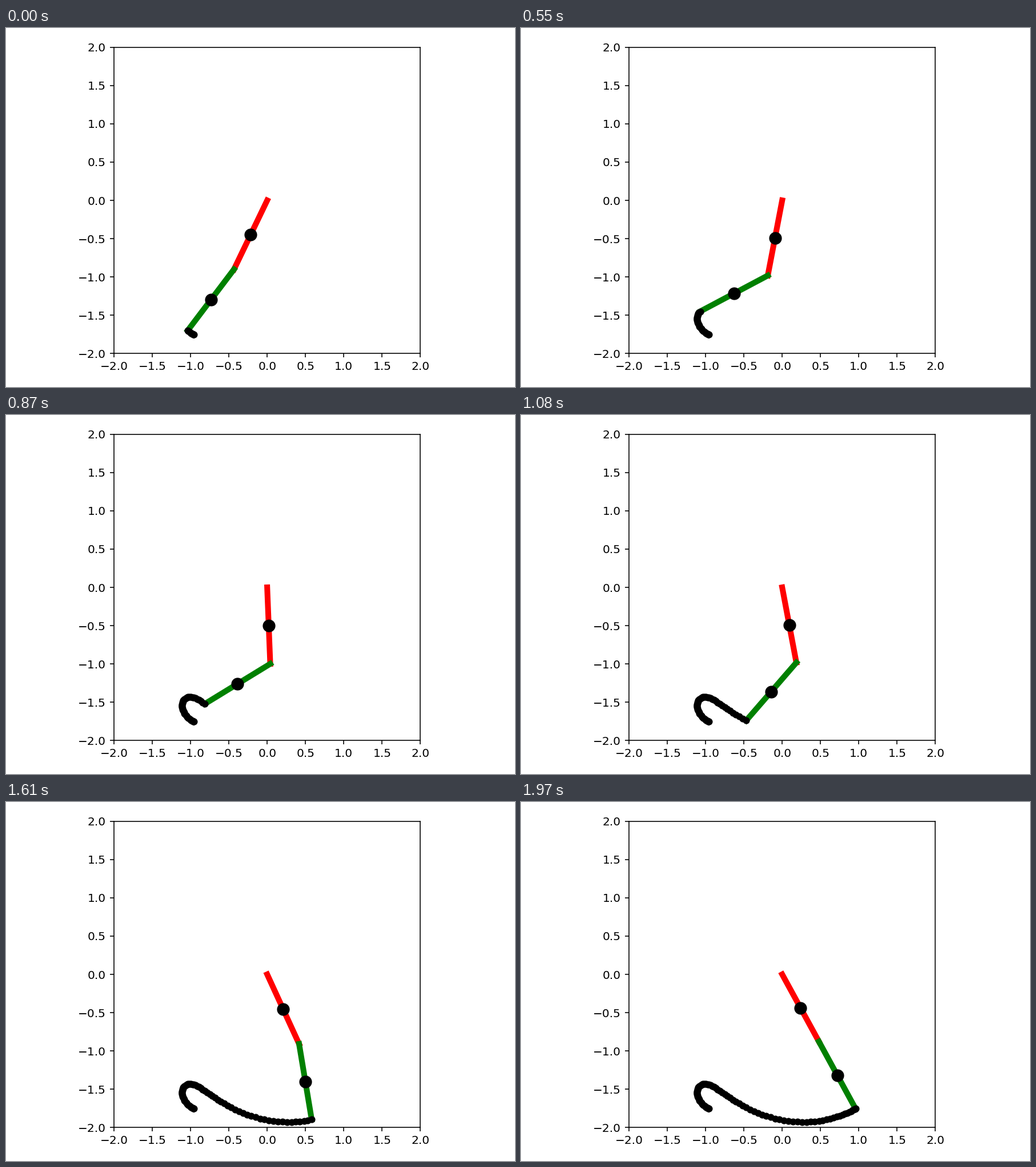
A matplotlib script that plays this animation: 891 by 629 pixels, repeating every 2070 ms.

```python
import numpy as np
import matplotlib.pyplot as plt
from matplotlib.animation import FuncAnimation

W, H, DPI = 891, 629, 144
PT = 145.15 / DPI          # point scale for text and strokes
TICK_MS, LOOP_MS = 10, 2070
SWING = 0.5                # the hip swings from -SWING to +SWING
FOLD = np.radians(61.3)    # deepest knee bend, halfway through
STEPS, LEAD = 90, 12       # LEAD steps are already traced at the start

# Playback pace: time in ms against steps taken
TIMES = [0, 20, 530, 550, 870, 1050, 1080, 1360, 1380, 1580, 1610, 1970]
COUNTS = [0, 1, 20, 21, 35, 43, 44, 56, 57, 62, 63, 77]


def ease(u):
    return u * u * (3 - 2 * u)


def pose(step):
    """Knee and foot positions after the given number of steps."""
    s = (np.asarray(step) + 0.4) / STEPS
    hip = SWING * (2 * ease(s) - 1)
    shin = hip - FOLD * ease(1 - np.abs(2 * s - 1))
    knee = np.array([np.sin(hip), -np.cos(hip)])
    foot = knee + np.array([np.sin(shin), -np.cos(shin)])
    return knee, foot


plt.rcParams.update({
    "font.family": "DejaVu Sans",
    "font.size": 10 * PT,
    "axes.linewidth": 0.8 * PT,
    "xtick.major.width": 0.8 * PT, "ytick.major.width": 0.8 * PT,
    "xtick.major.size": 3.5 * PT, "ytick.major.size": 3.5 * PT,
    "xtick.major.pad": 3.5 * PT, "ytick.major.pad": 3.5 * PT,
    "lines.markeredgewidth": PT,
})

fig = plt.figure(figsize=(W / DPI, H / DPI), dpi=DPI, facecolor="white")
ax = fig.add_axes([189 / W, 58.8 / H, 536.4 / W, 536.4 / H])
ax.set(xlim=(-2, 2), ylim=(-2, 2),
       xticks=np.arange(-2, 2.1, 0.5), yticks=np.arange(-2, 2.1, 0.5))

thigh, = ax.plot([], [], color="red", lw=5 * PT)
shank, = ax.plot([], [], color="green", lw=5 * PT)
masses, = ax.plot([], [], "ko", ms=10 * PT)
trail, = ax.plot([], [], "ko", ms=5 * PT)

PATH = pose(np.arange(STEPS))[1]


def draw(frame):
    count = np.interp(frame * TICK_MS, TIMES, COUNTS)
    step = LEAD + int(count + 1e-6)
    knee, foot = pose(step)
    thigh.set_data([0, knee[0]], [0, knee[1]])
    shank.set_data([knee[0], foot[0]], [knee[1], foot[1]])
    masses.set_data(*np.transpose([knee / 2, (knee + foot) / 2]))
    trail.set_data(*PATH[:, :step + 1])
    return thigh, shank, masses, trail


anim = FuncAnimation(fig, draw, frames=LOOP_MS // TICK_MS, interval=TICK_MS,
                     repeat=True, repeat_delay=0, blit=False)
plt.show()
```
